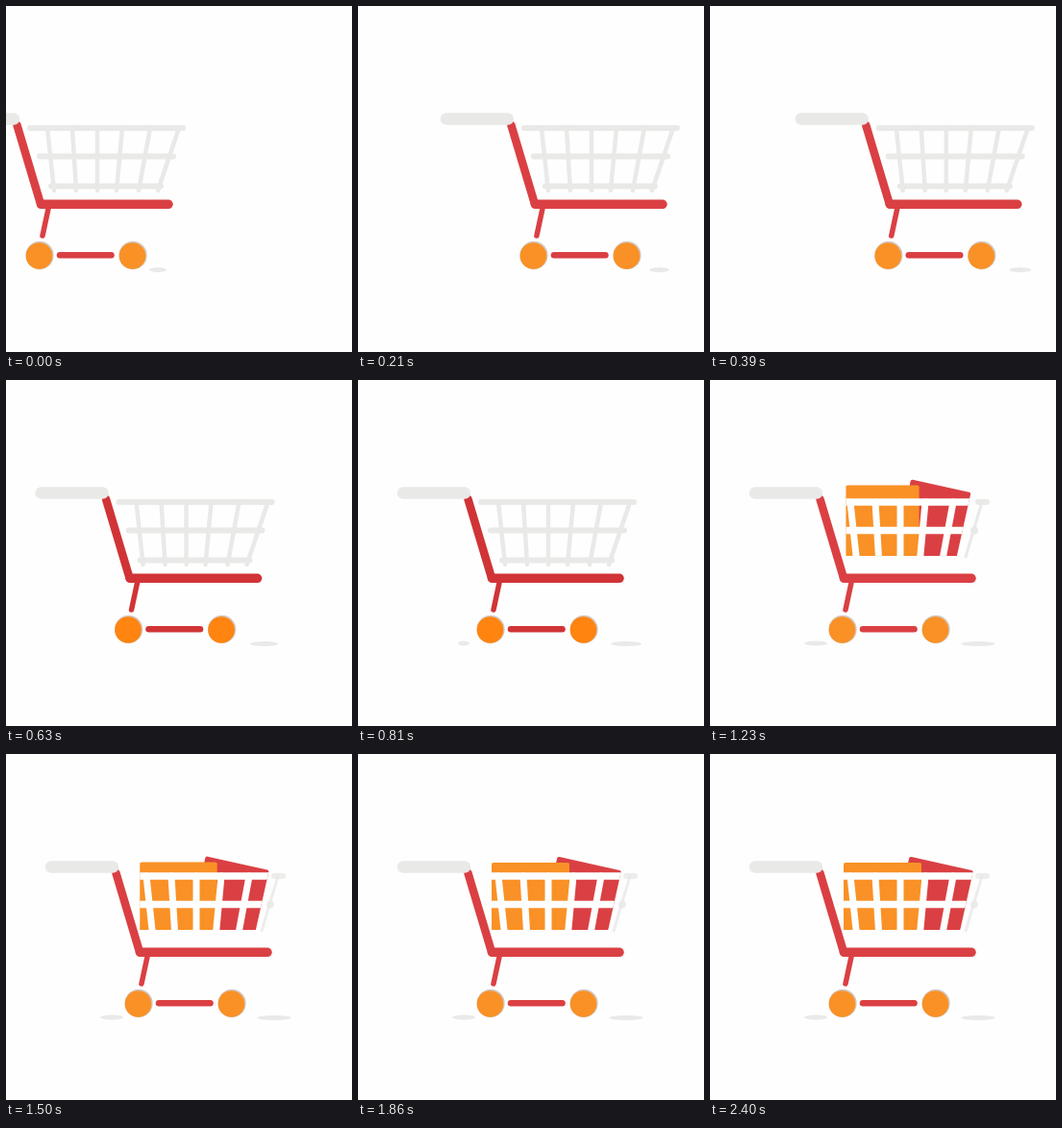
An HTML page with a canvas that plays this animation: 360 px wide and 360 px high, repeating every 2.43 s.

```html
<!DOCTYPE html>
<html lang="en">
<head>
<meta charset="utf-8">
<title>Shopping cart</title>
<style>
html, body { margin: 0; width: 100%; height: 100%; overflow: hidden; background: #fefefe; }
canvas { display: block; width: 360px; height: 360px; }
</style>
</head>
<body>
<canvas id="stage" width="360" height="360"></canvas>
<script>
const ctx = document.getElementById('stage').getContext('2d');
const LOOP = 2430, STEP = 60;
const WHITE = '#fefefe', GREY = '#e9e9e8';
// Basket posts: [top x, bottom x]
const POSTS = [[146, 153], [172, 176], [198, 198], [224, 218], [253, 241], [283, 261]];

const linear = p => p;
const easeOut = p => Math.sin(p * Math.PI / 2);
const easeInOut = p => (1 - Math.cos(p * Math.PI)) / 2;

// Keys are [time, value, easing towards this key]
function track(t, keys) {
  if (t <= keys[0][0]) return keys[0][1];
  for (let i = 1; i < keys.length; i++) {
    const [t0, v0] = keys[i - 1], [t1, v1, ease = linear] = keys[i];
    if (t < t1) return v0 + (v1 - v0) * ease((t - t0) / (t1 - t0));
  }
  return keys[keys.length - 1][1];
}

const cartX = t => track(t, [[0, -103], [300, 63, easeOut], [600, -11, easeInOut], [810, 0, easeInOut]]);
const boxY = t => track(t, [[840, 75], [990, 108], [1050, 128], [1110, 138], [1230, 147.5], [1500, 153.5]]);
const boxScale = t => track(t, [[870, 0], [990, .87], [1230, .94], [1500, 1]]);

function line(color, width, x0, y0, x1, y1) {
  ctx.strokeStyle = color;
  ctx.lineWidth = width;
  ctx.beginPath();
  ctx.moveTo(x0, y0);
  ctx.lineTo(x1, y1);
  ctx.stroke();
}

function oval(color, x, y, rx, ry = rx) {
  ctx.fillStyle = color;
  ctx.beginPath();
  ctx.ellipse(x, y, rx, ry, 0, 0, 7);
  ctx.fill();
}

function basket(color, bar, post) {
  line(color, bar, 128, 127, 287, 127);
  line(color, bar, 138, 156.5, 277, 156.5);
  line(color, bar, 150, 187.5, 264, 187.5);
  for (const [top, bottom] of POSTS) line(color, post, top, 127, bottom, 192);
}

function boxPath(x, y, w, h, angle, scale) {
  const m = new DOMMatrix().translate(x, y).rotate(angle).scale(scale);
  const path = new Path2D(), rect = new Path2D();
  rect.roundRect(-w / 2, -h / 2, w, h, 2);
  path.addPath(rect, m);
  return path;
}

function boxes(t, red, orange) {
  const scale = boxScale(t), y = boxY(t);
  if (!scale) return;
  const back = boxPath(232, y, 68, 81, 12.5, scale);
  const front = boxPath(179.5, y, 81, 81, 0, scale);
  const both = new Path2D(back);
  both.addPath(front);
  ctx.save();
  ctx.beginPath();
  ctx.rect(0, 0, 360, 183);
  ctx.clip();
  ctx.fillStyle = red;
  ctx.fill(back);
  ctx.fillStyle = orange;
  ctx.fill(front);
  ctx.clip(both);
  basket(WHITE, 7.5, 7);
  ctx.restore();
}

function wheel(x, color) {
  oval('#d2c9c4', x + .6, 259.4, 14.6);
  oval(color, x, 260, 13.8);
}

function draw(t) {
  const vivid = t >= 570 && t < 1080;
  const red = vivid ? '#d03436' : '#da4043';
  const orange = vivid ? '#ff8410' : '#f99126';

  ctx.fillStyle = WHITE;
  ctx.fillRect(0, 0, 360, 360);
  ctx.save();
  ctx.translate(cartX(t), 0);
  ctx.lineCap = 'round';

  // Ground shadows
  oval(GREY, track(t, [[0, 261], [390, 275], [630, 279]]), 274.5,
    track(t, [[0, 9], [390, 11.5], [630, 14.5], [990, 17.5]]), 2.4);
  if (t > 690) oval(GREY, 110, 274, track(t, [[690, 0], [930, 12]]), 2.4);

  // The empty basket fades as it fills; its far edge stays faintly visible
  ctx.globalAlpha = track(t, [[1030, 1], [1200, 0]]);
  basket(GREY, 6, 4.5);
  ctx.globalAlpha = track(t, [[1030, 0], [1200, 1], [1500, .8]]);
  line(GREY, 6, 279, 127, 288, 127);
  line(GREY, 3, 283, 127, 266, 184);
  oval(GREY, 275, 156.5, 4);
  ctx.globalAlpha = 1;

  boxes(t, red, orange);

  // Frame
  line(red, 8.5, 114.5, 124, 139, 206);
  line(red, 9.5, 139.5, 206.3, 272, 206.3);
  line(red, 5.5, 147, 211, 141, 239);
  line(red, 6.5, 159, 259.3, 212.5, 259.3);
  line(GREY, 12.5, 47, 117.6, 111, 117.6);
  wheel(137.5, orange);
  wheel(234.5, orange);
  ctx.restore();
}

function tick() {
  const t = performance.now() % LOOP;
  draw(Math.max(0, Math.floor((t + STEP / 2) / STEP) * STEP - STEP / 2));
  requestAnimationFrame(tick);
}
tick();
</script>
</body>
</html>
```
